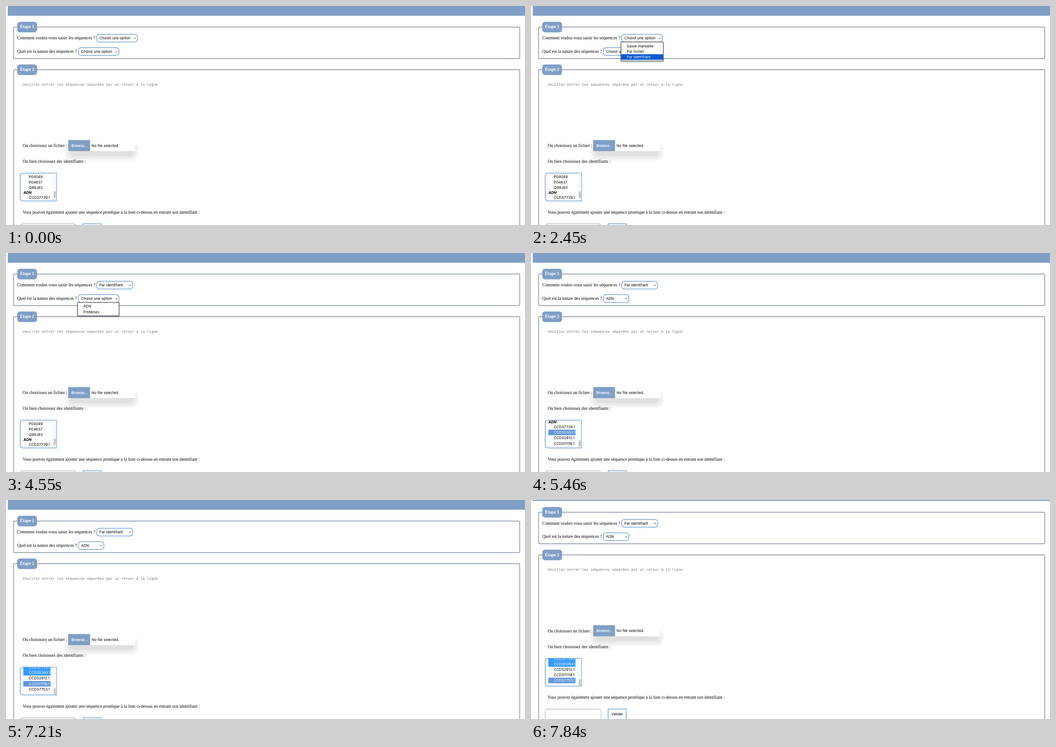
Write an HTML page that moves like this. It is 1151 px wide and 486 px high and loops after 8000 ms.

```html
<!DOCTYPE html>
<html lang="fr">
<head>
<meta charset="utf-8">
<title>Saisie des séquences</title>
<style>
  html, body { margin: 0; width: 100%; height: 100%; overflow: hidden; background: #fff; }
  svg { display: block; width: 1151px; height: 486px; }
  text { white-space: pre; }
  .serif { font: 9.72px "Liberation Serif", serif; }
  .badge { font-weight: bold; fill: #fff; }
  .mono { font: 7.9px "DejaVu Sans Mono", monospace; fill: #757575; }
  .ui { font: 8px Inter, sans-serif; }
  .strong { font-weight: 600; fill: #fff; }
  .item { font: 8.1px Inter, sans-serif; }
  .group { font: italic bold 8px Inter, sans-serif; }
  .field { fill: #fff; stroke: #5b93cf; stroke-width: 1.3; }
  .frame { fill: none; stroke: #65758f; stroke-width: 1.2; }
  .menu { filter: drop-shadow(0 2px 2px rgba(0, 0, 0, .22)); }
</style>
</head>
<body>
<svg id="stage" viewBox="0 0 1151 486">
  <defs><clipPath id="listClip"><rect x="32" y="371.2" width="72" height="61"/></clipPath></defs>
</svg>
<script>
const LOOP = 8000, TICK = 70, ROW = 12.2;
const BLUE = '#7f9fc6', HOVER = '#5f96dc', PICKED = '#3399ff', MENU = '#0058d0';
const stage = document.getElementById('stage');

function add(parent, tag, attrs = {}, content) {
  const el = document.createElementNS('http://www.w3.org/2000/svg', tag);
  for (const key in attrs) el.setAttribute(key, attrs[key]);
  if (content) el.textContent = content;
  parent.append(el);
  return el;
}
const box = (parent, x, y, x2, y2, attrs) =>
  add(parent, 'rect', { x, y, width: x2 - x, height: y2 - y, ...attrs });
const label = (parent, x, y, cls, content) =>
  add(parent, 'text', { x, y, class: cls }, content);
const show = (el, on) => el.setAttribute('visibility', on ? 'inherit' : 'hidden');

const page = add(stage, 'g');
box(page, 4, -30, 1151, 21.6, { fill: BLUE });

function fieldset(y, bottom, title) {
  box(page, 16.8, y, 1139.4, bottom, { class: 'frame', rx: 2.4 });
  box(page, 25, y - 11.7, 68.8, y + 11.8, { fill: BLUE, rx: 6 });
  label(page, 31, y + 2.7, 'serif badge', title);
}
fieldset(46.6, 116.6, 'Étape 1');
fieldset(141.4, 620, 'Étape 2');

label(page, 25, 74, 'serif', 'Comment voulez-vous saisir les séquences ?');
label(page, 25, 103.7, 'serif', 'Quel est la nature des séquences ?');
label(page, 37, 176.7, 'mono', 'Veuillez entrer les séquences séparées par un retour à la ligne');

// File input with its stepped shadow
box(page, 131, 303, 294, 343, { fill: '#f4f4f4', rx: 16 });
box(page, 136.5, 303, 289, 338, { fill: '#ebebeb', rx: 13 });
box(page, 142, 303, 283.5, 333, { fill: '#e0e0e0', rx: 10 });
box(page, 138, 297.5, 287, 322, { fill: '#fff' });
box(page, 138, 297.5, 186.5, 322, { fill: BLUE });
label(page, 145, 312.8, 'ui strong', 'Browse…');
label(page, 189.7, 312.8, 'ui', 'No file selected.');
label(page, 37, 313, 'serif', 'Ou choisissez un fichier :');
label(page, 37, 348, 'serif', 'Ou bien choisissez des identifiants :');
label(page, 37, 460.5, 'serif',
  'Vous pouvez également ajouter une séquence protéique à la liste ci-dessus en entrant son identifiant :');
box(page, 31.3, 483.4, 155.8, 507, { class: 'field', rx: 6, style: 'stroke:#a9b3c0;stroke-width:1.1' });
box(page, 171, 483.2, 211, 507, { class: 'field' });
label(page, 178, 497.6, 'ui', 'Valider');

// Identifier list
add(page, 'path', { class: 'field', d: 'M112 370.8H38.5Q31.5 370.8 31.5 377.8V425.6Q31.5 432.6 38.5 432.6H112Z' });
box(page, 104.3, 371.5, 111.3, 432, { fill: '#fafafa' });
box(page, 104.3, 371.5, 104.9, 432, { fill: '#e6e6e6' });
const thumb = box(page, 106.2, 411.2, 110.2, 426, { fill: '#c1c1c1', rx: 2 });
const clip = add(page, 'g', { 'clip-path': 'url(#listClip)' });
const list = add(clip, 'g');
const option = (name, y) => ({
  name, y,
  back: box(list, 38.4, y - ROW / 2, 98.7, y + ROW / 2, {}),
  text: label(list, 50.5, y + 2.9, 'item', name)
});
const rows = [
  ...['P04049', 'P04637', 'Q99J83'].map((n, i) => option(n, 378.7 + i * ROW)),
  ...['CCDS7729.1', 'CCDS5393.1', 'CCDS2612.1', 'CCDS11118.1', 'CCDS7753.1']
    .map((n, i) => option(n, 425 + i * ROW))
];
label(list, 38.7, 416.7, 'group', 'ADN');

function dropdown(x, y, menuBox, items) {
  const field = box(page, x, y, x + 90.4, y + 17.2, { class: 'field', rx: 6 });
  const value = label(page, x + 6, y + 11.5, 'ui');
  const arrow = add(page, 'path', { d: 'M-1.9 -.9L0 1L1.9 -.9', fill: 'none', stroke: '#000', 'stroke-width': 1 });
  const [mx, my, mx2, my2] = menuBox;
  const menu = { x: mx, y: my, x2: mx2, y2: my2, items };
  return {
    set(text, width) {
      value.textContent = text;
      field.setAttribute('width', width);
      arrow.setAttribute('transform', `translate(${x + width - 6} ${y + 9})`);
    },
    build() {
      const g = add(page, 'g', { class: 'menu' });
      box(g, menu.x, menu.y, menu.x2, menu.y2, { fill: '#fff', stroke: '#222', 'stroke-width': 1 });
      const lines = items.map((name, i) => {
        const top = menu.y + 2.8 + i * ROW;
        return {
          back: box(g, menu.x + .5, top, menu.x2 - .5, top + ROW, { fill: MENU }),
          text: label(g, menu.x + 12.9, top + 9, 'ui', name)
        };
      });
      this.open = (on, active) => {
        show(g, on);
        lines.forEach((line, i) => {
          show(line.back, on && i === active);
          line.text.setAttribute('fill', i === active ? '#fff' : '#000');
        });
      };
    }
  };
}
const mode = dropdown(201.1, 62.6, [199.6, 79.9, 293.3, 122], ['Saisie manuelle', 'Par fichier', 'Par identifiant']);
const kind = dropdown(160.4, 92.4, [158.7, 109.6, 250.7, 139.4], ['ADN', 'Protéines']);
mode.build();
kind.build();

// Steps: [time, value]; -1 is an open menu without highlight, null is closed
const modeSteps = [[0, null], [1400, -1], [1610, 0], [1820, 1], [2450, 2], [3360, -1], [3430, 2], [3500, null]];
const kindSteps = [[0, null], [3850, -1], [3990, 0], [4130, 1], [4340, 0], [4550, -1], [4620, 0], [4690, null]];
const pointerSteps = [[0, null], [4970, 400], [5670, 386], [6160, 398], [6720, 410], [7420, null], [7840, 420]];
const picks = { 'CCDS7729.1': 5950, 'CCDS5393.1': 6440 };

const at = (steps, t) => steps.filter(s => s[0] <= t).pop()[1];
function ramp(t, start, count) {
  const k = Math.max(0, Math.min(count, Math.floor((t - start) / TICK) + 1)) / count;
  return k * k * (3 - 2 * k);
}

function draw(t) {
  page.setAttribute('transform', `translate(0 ${-19.5 * ramp(t, 7420, 4)})`);

  if (t < 3500) mode.set('Choisir une option', 90.4);
  else mode.set('Par identifiant', 79.8);
  if (t < 4690) kind.set('Choisir une option', 90.2);
  else kind.set('ADN', 56.8);
  const m = at(modeSteps, t), k = at(kindSteps, t);
  mode.open(m !== null, m);
  kind.open(k !== null, k);

  const scroll = 39 * ramp(t, 5110, 6) + 14.8 * ramp(t, 6930, 5);
  list.setAttribute('transform', `translate(0 ${-scroll})`);
  thumb.setAttribute('y', 411.2 + scroll * .11);
  const pointer = at(pointerSteps, t);
  for (const row of rows) {
    const picked = t >= picks[row.name];
    const hover = pointer !== null && Math.abs(pointer + scroll - row.y) < ROW / 2;
    row.back.setAttribute('fill', picked ? PICKED : hover ? HOVER : 'none');
    row.text.setAttribute('fill', picked || hover ? '#fff' : '#000');
  }
}

const begin = performance.now();
function tick() {
  draw((performance.now() - begin) % LOOP);
  requestAnimationFrame(tick);
}
draw(0);
requestAnimationFrame(tick);
</script>
</body>
</html>
```
